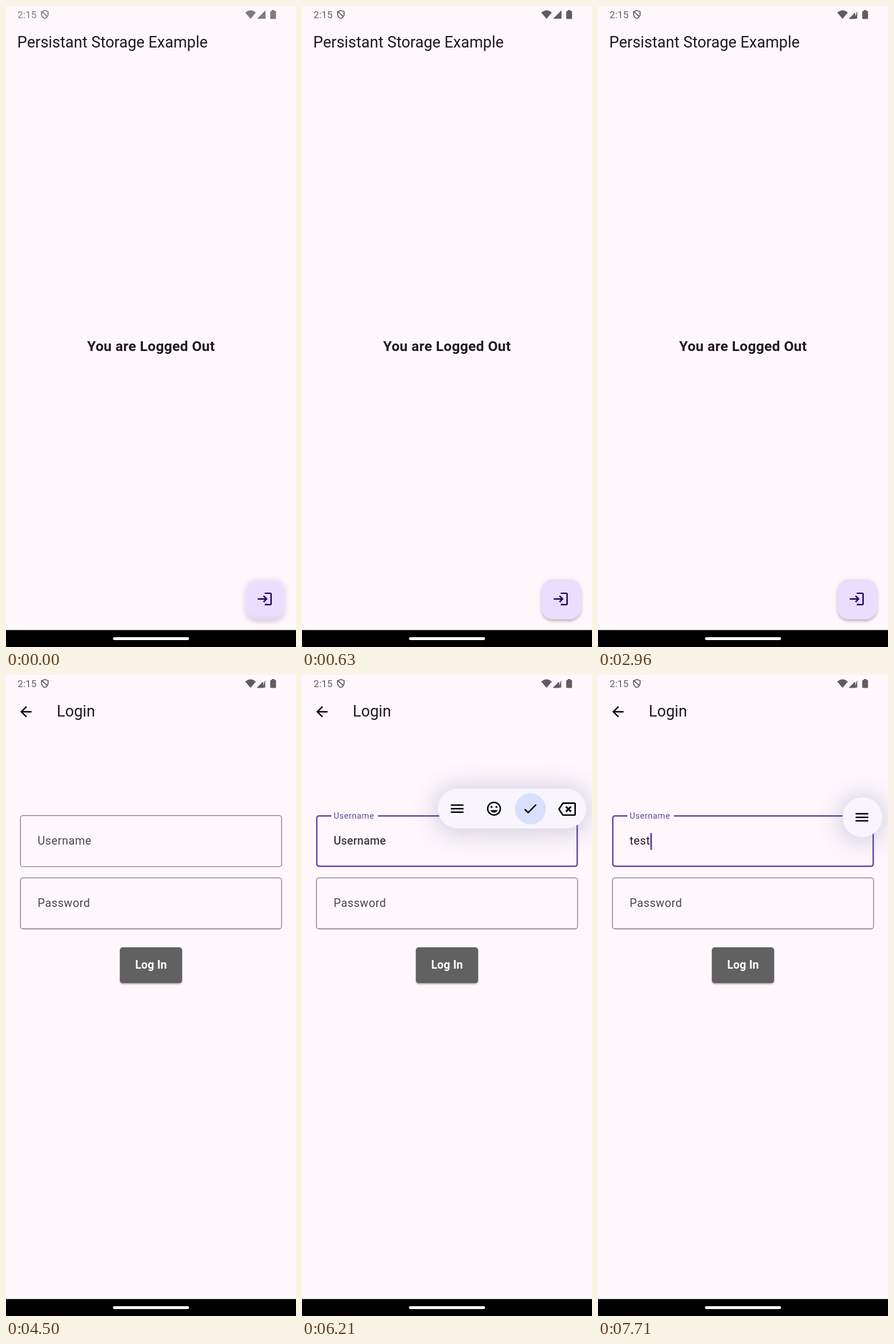
Animation of 504 by 1111 pixels, one loop 8 s. Source, as an HTML page:

```html
<!DOCTYPE html>
<html lang="en">
<head>
<meta charset="utf-8">
<title>Login demo</title>
<style>
  :root { --surface: #fef8fd; --ink: #1d1b20; --primary: #6048a6; --dp: 1.226px; }
  html, body { margin: 0; width: 100%; height: 100%; overflow: hidden; background: var(--surface); }
  #stage { position: relative; width: 504px; height: 1111px; overflow: hidden; font-family: Roboto, sans-serif; color: var(--ink); }
  #stage div, #stage svg, .text { position: absolute; box-sizing: border-box; }
  .page { inset: 0; background: var(--surface); }
  .text { line-height: 30px; white-space: pre; }
  .title { top: 48px; font-size: calc(22 * var(--dp)); }
  .message { top: 575px; width: 504px; text-align: center; font-size: calc(20 * var(--dp)); font-weight: 700; letter-spacing: .3px; }
  .fab { left: 415.5px; top: 993.5px; width: 69px; height: 69px; border-radius: 20px; background: #e9defe;
    box-shadow: 0 4px 5px -1px rgba(0,0,0,.24), 0 1px 8px rgba(0,0,0,.11); }
  .fields { left: 0; top: 0; fill: none; stroke: #7b7486; stroke-width: 1.3px; }
  #focus { stroke: var(--primary); stroke-width: 2.45px; }
  .body { left: 55px; font-size: calc(16 * var(--dp)); letter-spacing: .61px; }
  .user { top: 273px; }
  .label { color: #49454f; transform-origin: 0 50%; }
  #gap { left: 51px; top: 242px; width: 81px; height: 6px; background: var(--surface); transform-origin: 5px 0; }
  #hint { font-weight: 500; letter-spacing: .18px; color: #3f3b45; }
  #caret { left: 55px; top: 274px; width: 2.5px; height: 29px; background: var(--primary); }
  .button { left: 198px; top: 472px; width: 108px; height: 61.5px; border-radius: 5px; background: #616161; color: #fff;
    text-align: center; line-height: 61px; font-size: calc(16 * var(--dp)); font-weight: 700; letter-spacing: .12px;
    box-shadow: 0 2px 3px rgba(0,0,0,.28), 0 0 2px rgba(0,0,0,.2); }
  #bar { right: 10px; top: 197px; width: 258px; height: 69px; border-radius: 35px; overflow: hidden; background: #f8f6fc;
    box-shadow: 0 3px 44px 6px rgba(76,70,140,.24); }
  #bar .tick { left: 134px; top: 7.5px; width: 54px; height: 54px; border-radius: 50%; background: #d7e1fd; }
  .nav { left: 0; top: 0; }
</style>
</head>
<body>
<div id="stage">
  <div class="page" id="home">
    <span class="text title" style="left:19.6px">Persistant Storage Example</span>
    <span class="text message">You are Logged Out</span>
    <div class="fab" id="fab"></div>
    <svg data-icon="login" data-at="450 1028" fill="#21005d"></svg>
  </div>
  <div class="page" id="scrim"></div>
  <div class="page" id="login">
    <svg data-icon="back" data-at="34.3 63.2"></svg>
    <span class="text title" style="left:88.3px">Login</span>
    <svg class="fields" width="504" height="460">
      <rect id="plain" x="25.1" y="243.7" width="453.8" height="88.4" rx="4.3"/>
      <rect id="focus" x="25.7" y="244.3" width="452.6" height="87.2" rx="3.7"/>
      <rect x="25.1" y="351.6" width="453.8" height="88.4" rx="4.3"/>
    </svg>
    <div id="gap"></div>
    <span class="text body user label" id="label">Username</span>
    <span class="text body user" id="hint">Username</span>
    <span class="text body user" id="typed"></span>
    <div id="caret"></div>
    <span class="text body label" style="top:381px">Password</span>
    <div class="button">Log In</div>
    <div id="bar">
      <div class="tick"></div>
      <svg data-icon="menu" data-at="34 34.5"></svg>
      <svg data-icon="mood" data-at="97.5 34.5"></svg>
      <svg data-icon="check" data-at="161 34.5"></svg>
      <svg data-icon="erase" data-at="224 35.5" data-size="31"></svg>
    </div>
  </div>
  <div id="status" style="left:0;top:0">
    <span class="text" style="left:20px;top:0;font-size:17.2px;color:#625f65">2:15</span>
    <svg width="504" height="30" fill="#5f5b61">
      <path d="M67.5 7.8L73.2 9.8V14.2Q73 19.4 67.5 21.7Q62 19.4 61.8 14.2V9.8Z M62.4 9.6L72 18.6" fill="none" stroke="#5f5b61" stroke-width="1.7"/>
      <path d="M415.8 11.3Q425 3.7 434.2 11.3L425 22.2Z"/>
      <path id="full" d="M451 7.5V22H436.5Z"/>
      <path id="part" d="M446.5 12V22H436.5Z M450 10V21.3H446" stroke="#5f5b61" stroke-width="1"/>
      <path d="M462 7H466.5V8.7H468Q469.3 8.7 469.3 10V21Q469.3 22.4 468 22.4H460.6Q459.2 22.4 459.2 21V10Q459.2 8.7 460.6 8.7H462Z"/>
    </svg>
  </div>
  <svg class="nav" width="504" height="1111">
    <rect y="1081.6" width="504" height="30"/>
    <rect x="185.8" y="1094" width="132.4" height="4.9" rx="2.45" fill="#fff"/>
  </svg>
</div>
<script>
const LOOP = 8000;
const $ = id => document.getElementById(id);

const icons = {
  login: 'M11 7L9.6 8.4l2.6 2.6H2v2h10.2l-2.6 2.6L11 17l5-5zM20 19h-8v2h8c1.1 0 2-.9 2-2V5c0-1.1-.9-2-2-2h-8v2h8z',
  back: 'M20 11H7.83l5.59-5.59L12 4l-8 8 8 8 1.41-1.41L7.83 13H20z',
  menu: 'M3 18h18v-2H3zM3 13h18v-2H3zM3 6v2h18V6z',
  check: 'M9 16.2L4.8 12l-1.4 1.4L9 19 21 7l-1.4-1.4z',
  mood: 'M12 2a10 10 0 1 0 0 20 10 10 0 1 0 0-20zM12 4a8 8 0 1 1 0 16 8 8 0 1 1 0-16z' +
    'M8.5 8a1.5 1.5 0 1 0 0 3 1.5 1.5 0 1 0 0-3zM15.5 8a1.5 1.5 0 1 0 0 3 1.5 1.5 0 1 0 0-3z' +
    'M6.9 14c.8 2 2.8 3.5 5.1 3.5s4.3-1.5 5.1-3.5z',
  erase: 'M22 3H7c-.7 0-1.2.4-1.6.9L0 12l5.4 8.1c.4.5.9.9 1.6.9h15c1.1 0 2-.9 2-2V5c0-1.1-.9-2-2-2z' +
    'M22 19H7.1L2.4 12l4.7-7H22z' +
    'M14 10.4l-2.6-2.6-1.6 1.6 2.6 2.6-2.6 2.6 1.6 1.6 2.6-2.6 2.6 2.6 1.6-1.6-2.6-2.6 2.6-2.6-1.6-1.6z'
};

for (const svg of document.querySelectorAll('[data-icon]')) {
  const [x, y] = svg.dataset.at.split(' ').map(Number);
  const size = +svg.dataset.size || 29.4;
  svg.setAttribute('viewBox', '0 0 24 24');
  svg.style.cssText = `left:${x - size / 2}px;top:${y - size / 2}px;width:${size}px;height:${size}px`;
  svg.innerHTML = `<path fill-rule="evenodd" d="${icons[svg.dataset.icon]}"/>`;
}

// Measure the typed letters before any page is scaled.
const typed = $('typed');
typed.innerHTML = [...'test'].map(c => `<span>${c}</span>`).join('');
const letters = [...typed.children];
const left = typed.getBoundingClientRect().left;
const ends = letters.map(l => l.getBoundingClientRect().right - left);

// Steps are [ms, properties, easing to the next step].
const tracks = [];
function play(el, steps) {
  const frames = steps.map(([ms, props, easing = 'linear']) => ({ offset: ms / LOOP, easing, ...props }));
  if (frames[0].offset > 0) frames.unshift({ ...frames[0], offset: 0, easing: 'linear' });
  const last = frames[frames.length - 1];
  if (last.offset < 1) frames.push({ ...last, offset: 1 });
  tracks.push(el.animate(frames, { duration: LOOP, iterations: Infinity }));
}

// Hard opacity switches at the given times.
function blink(el, start, times) {
  let on = start;
  const steps = [[0, { opacity: on }]];
  for (const ms of times) {
    steps.push([ms, { opacity: on }]);
    on = 1 - on;
    steps.push([ms, { opacity: on }]);
  }
  play(el, steps);
}

const fade = (el, start, end, from = 0) =>
  play(el, [[start, { opacity: from }], [end, { opacity: 1 - from }]]);

// Opening picture sharpens.
play($('fab'), [[0, { filter: 'blur(3px)' }], [420, { filter: 'blur(0px)' }]]);
play($('status'), [[0, { opacity: .8 }], [420, { opacity: 1 }]]);
blink($('full'), 1, [1250]);
blink($('part'), 0, [1250]);

// Zoom page transition.
const OPEN = 3960, SPAN = 300;
const zoomIn = 'cubic-bezier(.05,0,.133,.06)', zoomOut = 'cubic-bezier(.208,.82,.25,1)';
const zoom = (el, from, to) => play(el, [
  [OPEN, { transform: `scale(${from})` }, zoomIn],
  [OPEN + SPAN / 6, { transform: `scale(${from + (to - from) * .4})` }, zoomOut],
  [OPEN + SPAN, { transform: `scale(${to})` }]
]);
zoom($('home'), 1, 1.05);
zoom($('login'), .85, 1);
fade($('scrim'), OPEN + SPAN * .2075, OPEN + SPAN * .4175);
fade($('login'), OPEN + SPAN * .125, OPEN + SPAN * .25);

// Username field gains focus.
const FOCUS = 5370, ease = 'cubic-bezier(.4,0,.2,1)';
fade($('plain'), FOCUS, FOCUS + 167, 1);
fade($('focus'), FOCUS, FOCUS + 167);
play($('gap'), [[FOCUS, { transform: 'scaleX(0)' }, ease], [FOCUS + 167, { transform: 'scaleX(1)' }]]);
play($('label'), [
  [FOCUS, { transform: 'translateY(0px) scale(1)', color: '#49454f' }, ease],
  [FOCUS + 167, { transform: 'translateY(-44px) scale(.75)', color: '#6048a6' }]
]);

// Typing.
const keys = [6870, 7040, 7250, 7460];
letters.forEach((l, i) => blink(l, 0, [keys[i]]));
play($('hint'), [
  [FOCUS, { opacity: 0 }], [FOCUS + 200, { opacity: 1 }],
  [keys[0], { opacity: 1 }], [keys[0], { opacity: 0 }]
]);
blink($('caret'), 0, [FOCUS, FOCUS + 500, FOCUS + 1010]);
const shift = x => ({ transform: `translateX(${x}px)` });
play($('caret'), keys.flatMap((ms, i) => [
  [ms, shift(i ? ends[i - 1] : 0)], [ms, shift(ends[i])]
]));

// Floating toolbar opens, then folds into a round button.
play($('bar'), [
  [5880, { opacity: 0, transform: 'scale(.9)' }, 'ease-out'],
  [6090, { opacity: 1, transform: 'scale(1)' }]
]);
play($('bar'), [
  [6870, { width: '258px', top: '197px' }, ease],
  [7170, { width: '69px', top: '211.5px' }]
]);

const now = document.timeline.currentTime;
tracks.forEach(t => { t.startTime = now; });
</script>
</body>
</html>
```
